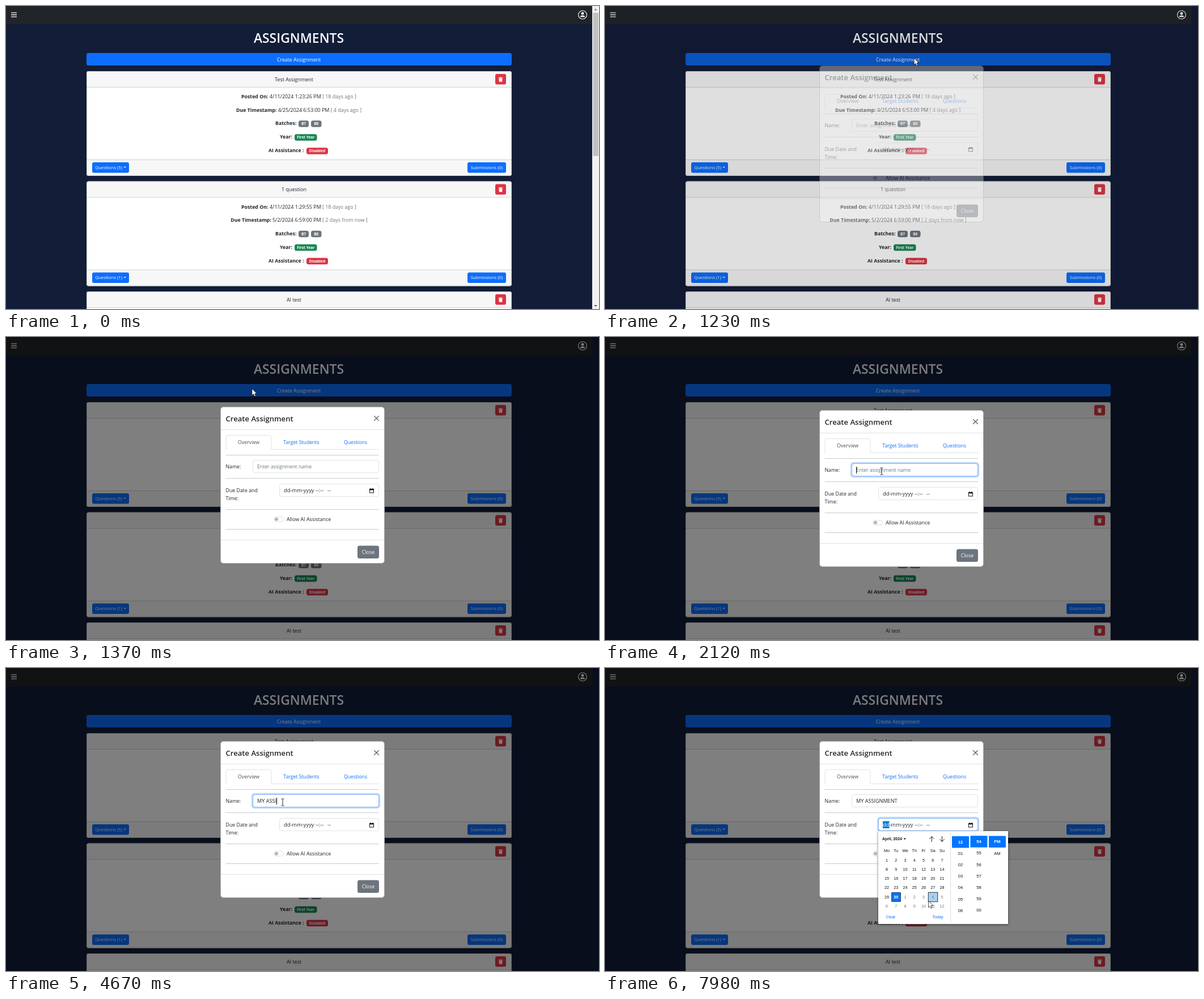
An HTML page that plays this animation: 1046 by 535 pixels, repeating every 8 s.

```html
<!DOCTYPE html>
<html lang="en">
<head>
<meta charset="utf-8">
<title>Assignments</title>
<style>
html, body { margin: 0; width: 100%; height: 100%; overflow: hidden; background: #121d38; }
svg { display: block; width: 1046px; height: 535px; font-family: "Open Sans", "Noto Sans", sans-serif; white-space: pre; }
.picker { font-family: "Liberation Sans", Arial, sans-serif; text-anchor: middle; }
</style>
</head>
<body>
<script>
const INK = '#212529', BLUE = '#0d6efd', RED = '#dc3545', GREY = '#6c757d', LINE = '#dee2e6', PICK = '#0075ff';
const MID = 'text-anchor="middle"', BOLD = 'font-weight="700"', SEMI = 'font-weight="600"';

// Text is placed by the middle of its capitals.
const text = (x, y, s, size = 8.8, fill = INK, more = '') =>
  `<text x="${x}" y="${y + size * 0.35}" font-size="${size}" fill="${fill}" ${more}>${s}</text>`;
const rect = (x, y, w, h, fill, r = 0, more = '') =>
  `<rect x="${x}" y="${y}" width="${w}" height="${h}" rx="${r}" fill="${fill}" ${more}/>`;
const path = (d, fill, more = '') => `<path d="${d}" fill="${fill}" ${more}/>`;
const stroke = (d, color, width) => path(d, 'none', `stroke="${color}" stroke-width="${width}"`);
const group = (id, body, more = '') => `<g id="${id}" ${more}>${body}</g>`;
const box = (x, y, w, h, fill, border, r) =>
  rect(x + .5, y + .5, w - 1, h - 1, fill, r, `stroke="${border}"`);
const badge = (x, y, w, s, fill) =>
  rect(x, y - 5.5, w, 11.5, fill, 3.5) + text(x + w / 2, y + .3, s, 6.6, '#fff', MID + BOLD);

function card(y, title, count, rows) {
  const label = (x, dy, s) => text(x, y + dy, s, 8.8, INK, BOLD);
  const trash = path(`M868.8 ${y + 11.2}h2.2l.5-.8h2l.5.8h2.2v1.2h-7.4zM869.4 ${y + 13}h6.2l-.5 5.8h-5.2z`, '#fff');
  return rect(142, y, 750, 185, '#fff', 4) +
    path(`M142 ${y + 28}v-24q0-4 4-4h742q4 0 4 4v24z`, '#f7f7f7') +
    path(`M142 ${y + 157}v24q0 4 4 4h742q4 0 4-4v-24z`, '#f7f7f7') +
    rect(142, y + 28, 750, 1, '#d2d2d2') + rect(142, y + 156, 750, 1, '#d2d2d2') +
    rect(142.5, y + .5, 749, 184, 'none', 4, 'stroke="#000" stroke-opacity=".175"') +
    text(508, y + 14.5, title, 8.95, INK, MID) +
    rect(863, y + 5, 19, 18.5, RED, 3) + trash +
    rows.map(([s, x, date, dateX, ago, agoX], i) => {
      const dy = 45.3 + i * 23.4;
      return label(x, dy, s) + text(dateX, y + dy, date, 8.95) + text(agoX, y + dy, ago, 8.95, GREY);
    }).join('') +
    label(475, 92, 'Batches:') + badge(516, y + 92.7, 18, 'B7', GREY) + badge(538, y + 92.7, 18.5, 'B8', GREY) +
    label(483, 116, 'Year:') + badge(509, y + 116.7, 39.5, 'First Year', '#198754') +
    label(463, 140, 'AI Assistance :') + badge(530, y + 140.7, 38, 'Disabled', RED) +
    rect(152, y + 161, 65, 18.5, BLUE, 3) + text(157.3, y + 170, `Questions (${count})`, 7.75, '#fff') +
    path(`M207.5 ${y + 168.8}h4.4l-2.2 2.3z`, '#fff') +
    rect(814, y + 161, 68, 18.5, BLUE, 3) + text(848, y + 170, 'Submissions (0)', 7.75, '#fff', MID);
}

const page = rect(0, 0, 1046, 535, '#121d38') + rect(0, 0, 1034, 32, '#212529') +
  stroke('M9 11.8h10M9 15.5h10M9 19.2h10', '#fff', 1.3) +
  '<circle cx="1017" cy="15.6" r="7.4" fill="none" stroke="#fff" stroke-width="1.1"/>' +
  '<circle cx="1017" cy="13.2" r="2.4" fill="#fff"/>' + path('M1012.8 19.4q0-3 4.2-3t4.2 3z', '#fff') +
  text(516.5, 56.6, 'ASSIGNMENTS', 22.9, '#f8f9fa', MID + SEMI) +
  rect(142, 83, 750, 22, BLUE, 3.5, 'id="create"') + text(516.5, 94.5, 'Create Assignment', 8.8, '#fff', MID) +
  card(115, 'Test Assignment', 5, [
    ['Posted On:', 415, '4/11/2024 1:23:26 PM', 465, '[ 18 days ago ]', 558],
    ['Due Timestamp:', 406, '4/25/2024 6:53:00 PM', 479.7, '[ 4 days ago ]', 572.5]]) +
  card(309.5, '1 question', 1, [
    ['Posted On:', 415, '4/11/2024 1:29:55 PM', 465, '[ 18 days ago ]', 558],
    ['Due Timestamp:', 396.3, '5/2/2024 6:59:00 PM', 470, '[ 2 days from now ]', 558]]) +
  card(504, 'AI test', 1, []);

const scrollbar = rect(1034, 0, 12, 535, '#f1f1f1') + rect(1035.5, 12, 9.5, 253, '#c1c1c1') +
  path('M1037.5 7.5h5l-2.5-3z', '#7a7a7a') + path('M1037.5 528h5l-2.5 3z', '#505050');

const ring = (id, x, y, w, h) => group(id,
  rect(x - .8, y - .8, w + 1.6, h + 1.6, 'none', 4.5, 'stroke="#0d6efd" stroke-opacity=".27" stroke-width="2.8"') +
  box(x, y, w, h, 'none', '#86b7fe', 3.5));

const modal = box(378, 129, 290, 277, '#fff', '#a9a9a9', 5) +
  text(387.5, 150, 'Create Assignment', 13.1, INK, SEMI) +
  stroke('M649.2 145.2l8.6 8.6m0-8.6l-8.6 8.6', '#606060', 1.3) +
  rect(379, 169, 288, 1, LINE) + rect(379, 364, 288, 1, LINE) + rect(387.5, 204, 270.5, 1, LINE) +
  path('M388 205v-21.500q0-4 4-4h72q4 0 4 4v21.500', '#fff', `stroke="${LINE}"`) +
  text(428, 192, 'Overview', 8.8, '#495057', MID) +
  text(521, 192, 'Target Students', 8.7, BLUE, MID) + text(616.5, 192, 'Questions', 8.7, BLUE, MID) +
  [214, 255, 310, 345].map(y => rect(387.5, y, 270.5, 1, '#c8c9ca')).join('') +
  text(387.5, 235, 'Name:', 8.75) + box(435, 223, 223, 23, '#fff', LINE, 3.5) + ring('nameRing', 435, 223, 223, 23) +
  group('hint', text(443, 235, 'Enter assignment name', 8.7, GREY)) +
  group('typed', text(443, 235, '', 9.1)) + rect(443, 229, 1, 12, '#000', 0, 'id="caret"') +
  text(387.5, 276.500, 'Due Date and', 8.8) + text(387.5, 291, 'Time:', 8.8) +
  box(482, 265, 176, 23, '#fff', LINE, 3.5) + ring('dateRing', 482, 265, 176, 23) +
  rect(490, 270.5, 11.500, 12.5, '#0078d7', 0, 'id="mark"') +
  group('day', text(490, 277, 'dd', 9.3)) + text(501.500, 277, '-mm-yyyy', 9.3) +
  text(546, 277, '--:--', 9.3) + text(567, 277, '--', 9.3) +
  path('M641 274h1.500v-1.200h1.200v1.200h2.600v-1.200h1.200v1.200h1.500v7.400h-8zM642 276.300v4.100h6v-4.100z', '#111', 'fill-rule="evenodd"') +
  rect(472.5, 323.5, 17, 8.500, '#fff', 4.25, 'stroke="#dcdee0"') + '<circle cx="477" cy="327.700" r="3" fill="#b5b5b5"/>' +
  text(495, 328, 'Allow AI Assistance', 8.9) +
  rect(620, 374.500, 38, 22.500, GREY, 3.5) + text(639, 386, 'Close', 8.900, '#fff', MID);

const suggestions = path('M516 253.500l6-5.500 6 5.500z', '#1e2624') + rect(507.500, 253, 121.500, 162, '#1e2624', 5) +
  ['tttt', 'Testing Assignment', 'weweq', 'testt', 'Gonna Delete', 'Both Questions']
    .map((s, i) => text(516, 269.700 + i * 26, s, 8.7, '#e6eae8', SEMI)).join('');

const COL = 16.25, ROW = 16.3, pad = n => String(n).padStart(2, '0');
const cellX = i => 497 + COL * i, cellY = i => 339 + ROW * i;
const days = Array.from({ length: 42 }, (_, i) => {
  const x = cellX(i % 7), y = cellY(Math.floor(i / 7)), today = i === 29;
  return (today ? box(x - 8, y - 8, 16.500, 16.500, PICK, '#12233d', 0) : '') +
    text(x, y, i < 30 ? i + 1 : i - 29, 7.2, today ? '#fff' : i < 30 ? '#111' : '#777', today ? BOLD : '');
}).join('');
const column = (x, y, head, items) =>
  rect(x - 15, y - 10, 30, 20.500, PICK, 1) + text(x, y, head, 7.6, '#fff', BOLD) +
  items.map((s, i) => text(x, y + 20.500 + i * 20.100, s, 7.6, '#111')).join('');
const picker = rect(482, 288, 229, 164, '#fff', 0, 'style="filter:drop-shadow(0 1px 2px #0008)"') +
  text(489, 301.500, 'April, 2024', 6.9, '#111', BOLD + ' style="text-anchor:start"') + path('M526.500 300.500h4.500l-2.250 2.700z', '#111') +
  stroke('M576.300 307v-9.500m-4 4.300l4-4.300 4 4.300M594.500 297v9.500m-4-4.300l4 4.300 4-4.300', '#222', 1) +
  ['Mo', 'Tu', 'We', 'Th', 'Fr', 'Sa', 'Su'].map((s, i) => text(cellX(i), 322.500, s, 7.2, '#111')).join('') +
  rect(0, 396, 16.500, 16.500, '#a8d0f5', 0, 'id="hover" stroke="#333"') + days +
  text(504, 439.500, 'Clear', 7.1, PICK) + text(587, 439.500, 'Today', 7.1, PICK) +
  rect(609, 290, 1, 160, '#dcdcdc') +
  column(627, 307, 12, [1, 2, 3, 4, 5, 6].map(pad)) +
  column(659.500, 306.300, 54, [55, 56, 57, 58, 59, '00']) + column(692, 306.500, 'PM', ['AM']);

const EDGE = 'stroke="#000" stroke-width=".7"';
const cursor =
  group('arrow', path('M0 0V11.800L2.700 9.400 4.500 13.300 6.500 12.400 4.800 8.600H8.400Z', '#fff', EDGE)) +
  group('hand', path('M-1.200 1a1.200 1.200 0 0 1 2.400 0V4.500L5 5.400Q6 5.800 5.800 7L5 12H-.8L-4 7.800Q-4 6.200-2.600 6.800L-1.200 8Z', '#fff', EDGE)) +
  group('beam', stroke('M-2.500-6h2l.5.500.5-.5h2M0-5.500v11M-2.500 6h2l.5-.5.5.500h2', '#222', 1));

document.body.innerHTML = '<svg viewBox="0 0 1046 535">' + page + group('scrollbar', scrollbar) +
  rect(0, 0, 1046, 535, '#000', 0, 'id="backdrop"') + group('modal', modal) +
  group('suggestions', suggestions) + group('picker', picker, 'class="picker"') + group('cursor', cursor) + '</svg>';

const $ = id => document.getElementById(id);
const set = (id, name, value) => $(id).setAttribute(name, value);
const fade = (id, value) => set(id, 'opacity', Number(value));
const ramp = (t, start, length) => Math.min(1, Math.max(0, (t - start) / length));
const typedNode = $('typed').firstChild, dayNode = $('day').firstChild;

// [ms, x, y] of the pointer
const route = [
  [190, 640, -20], [530, 580, 205], [830, 548, 112], [970, 546, 92], [1230, 546, 92], [1370, 434, 91],
  [1500, 428, 135], [1750, 474, 222], [1850, 488, 237], [6000, 488, 237], [6270, 719, 12], [6400, 719, 12],
  [6470, 646, 48], [6690, 640, 230], [6830, 648, 282], [7030, 650, 278], [7650, 650, 278], [7980, 570.5, 411]];
const NAME = 'MY ASSIGNMENT';
const keyTimes = [3140, 3340, 3480, 3810, 4340, 4540, 4670, 4800, 4870, 5070, 5200, 5530, 5660];
const FOCUS = 2060, OPEN = 1180, PICKER = 7030;

function pointer(t) {
  if (t <= route[0][0]) return route[0].slice(1);
  const i = route.findIndex(p => p[0] >= t);
  if (i < 0) return route[route.length - 1].slice(1);
  const [a, x, y] = route[i - 1], [b, u, v] = route[i], p = (t - a) / (b - a);
  return [x + (u - x) * p, y + (v - y) * p];
}

function draw(t) {
  const [x, y] = pointer(t);
  const inside = (l, top, r, bottom) => x >= l && x <= r && y >= top && y <= bottom;
  const onCreate = t < 1300 && inside(142, 83, 892, 105);
  const onName = t > 1500 && inside(435, 223, 658, 246);
  set('cursor', 'transform', `translate(${x} ${y})`);
  fade('hand', onCreate && t < OPEN);
  fade('beam', onName);
  fade('arrow', !onName && !(onCreate && t < OPEN));
  set('create', 'fill', onCreate ? '#0b5ed7' : BLUE);

  fade('scrollbar', t < OPEN);
  fade('backdrop', ramp(t, OPEN + 13, 150) / 2);
  fade('modal', ramp(t, OPEN, 150));
  set('modal', 'transform', `translate(0 ${-33 * (1 - ramp(t, OPEN, 300)) ** 1.7})`);

  const typed = keyTimes.filter(k => k <= t).length;
  const lastInput = typed ? keyTimes[typed - 1] : FOCUS;
  typedNode.textContent = NAME.slice(0, typed);
  fade('hint', !typed);
  set('caret', 'x', Math.round(443 + (typed ? typedNode.getComputedTextLength() : 0)));
  fade('caret', t >= FOCUS && t < PICKER && Math.floor((t - lastInput) / 530) % 2 === 0);
  fade('nameRing', ramp(t, 1900, 150) - ramp(t, PICKER, 150));
  fade('suggestions', ramp(t, 2190, 130) - ramp(t, 3100, 300));

  fade('dateRing', ramp(t, PICKER, 150));
  fade('mark', t >= PICKER);
  dayNode.setAttribute('fill', t >= PICKER ? '#fff' : INK);
  fade('picker', t >= PICKER + 130);
  const col = Math.floor((x - cellX(0)) / COL + .5), row = Math.floor((y - cellY(0)) / ROW + .5);
  fade('hover', col >= 0 && col < 7 && row >= 0 && row < 6);
  set('hover', 'x', cellX(col) - 8);
  set('hover', 'y', cellY(row) - 8);
}

function tick() {
  draw(performance.now() % 8000);
  requestAnimationFrame(tick);
}
tick();
</script>
</body>
</html>
```
